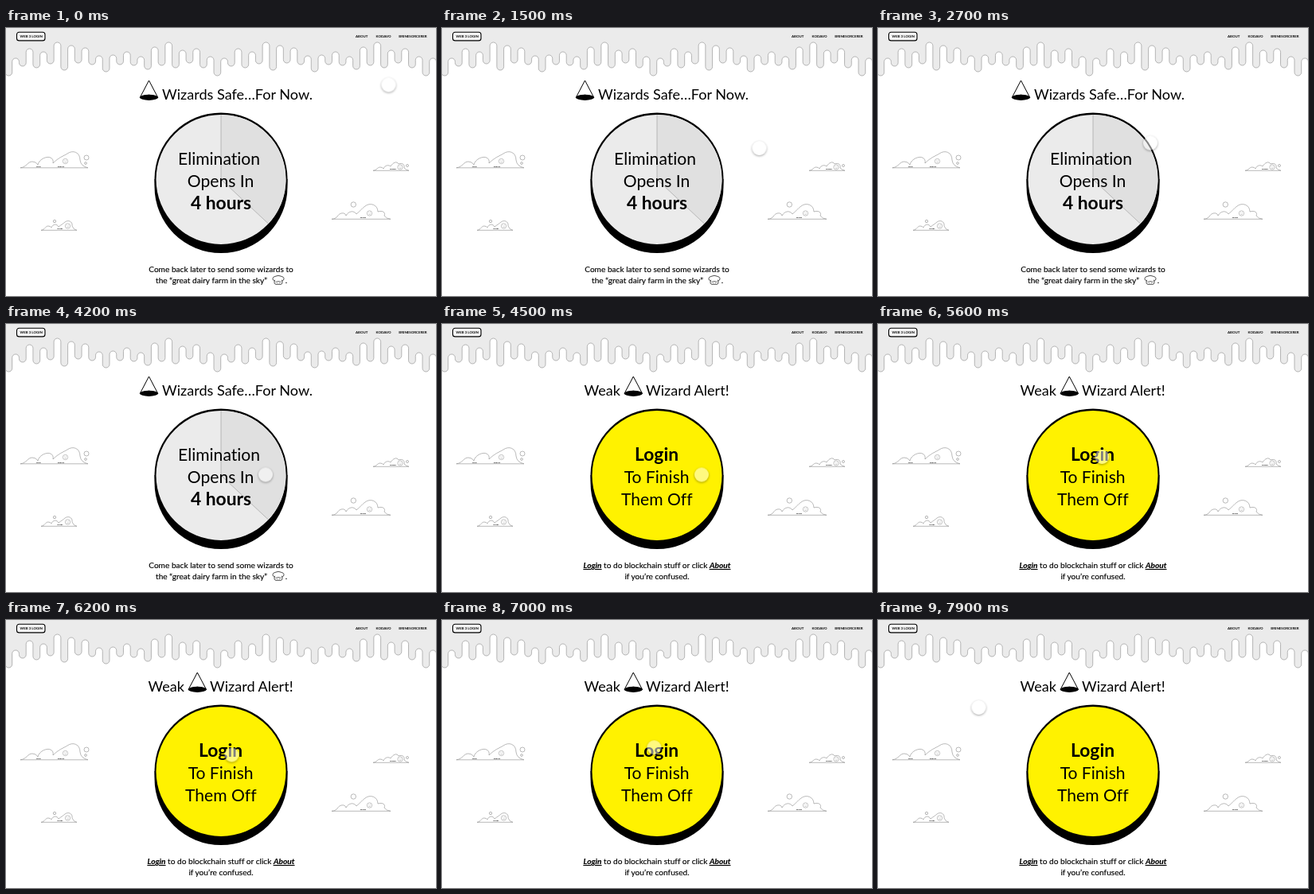
These frames come from a looping animation (540x337 px, 8 s). An HTML page:

```html
<!DOCTYPE html>
<html lang="en">
<head>
<meta charset="utf-8">
<title>Wizard button</title>
<style>
  html, body { margin: 0; width: 100%; height: 100%; overflow: hidden; background: #fff; }
  #stage { position: absolute; left: 0; top: 0; width: 540px; height: 337px; overflow: hidden; }
  svg { display: block; }
  text { font-family: Lato, "Noto Sans", sans-serif; font-variant-ligatures: none; fill: #000; }
  .mid { text-anchor: middle; }
  .end { text-anchor: end; }
  .bold { font-weight: 700; }
  .nav { font-size: 4.4px; font-weight: 700; }
  .title { font-size: 18.1px; }
  .big { font-size: 21.1px; }
  .big.bold { font-size: 22.8px; }
  .note { font-size: 10.15px; stroke: #000; stroke-width: .15; }
  .link { font-weight: 700; font-style: italic; text-decoration: underline; }
  .tiny { font-size: 2.4px; font-weight: 700; text-anchor: middle; }
  .thin { fill: #fff; stroke: #8a8a8a; stroke-width: .6; }
  .bare { fill: none; }

  #wait { animation: wait 8s step-end infinite; }
  #alert { animation: alert 8s step-end infinite; }
  @keyframes wait { 0% { visibility: visible; } 56.25%, 100% { visibility: hidden; } }
  @keyframes alert { 0% { visibility: hidden; } 56.25%, 100% { visibility: visible; } }

  #pointer {
    position: absolute; left: -9px; top: -9px; width: 18px; height: 18px;
    border-radius: 50%; background: rgba(255, 255, 255, .5);
    box-shadow: 0 1px 3px rgba(0, 0, 0, .38);
    animation: move 8s linear infinite;
  }
  @keyframes move {
    0%, 1.25% { transform: translate(480.5px, 71.5px); animation-timing-function: ease-in-out; }
    10%, 17.5% { transform: translate(400.5px, 145px); }
    18.75% { transform: translate(398.5px, 151px); }
    20%, 27.5% { transform: translate(398px, 151.5px); animation-timing-function: ease-in; }
    33.75% { transform: translate(342px, 144.5px); animation-timing-function: ease-out; }
    38.75% { transform: translate(324px, 173px); animation-timing-function: ease-out; }
    41.25%, 48.75% { transform: translate(326px, 188px); }
    50%, 51.25% { transform: translate(326px, 189px); }
    52.5%, 57.5% { transform: translate(326px, 189.5px); animation-timing-function: ease-in-out; }
    66.25% { transform: translate(290px, 173px); animation-timing-function: ease-in-out; }
    72.5% { transform: translate(277px, 164px); animation-timing-function: ease-in-out; }
    77.5% { transform: translate(283.5px, 169.5px); animation-timing-function: ease-in-out; }
    88.75% { transform: translate(266px, 160px); animation-timing-function: ease-in-out; }
    98.75%, 100% { transform: translate(126.5px, 110px); }
  }
</style>
</head>
<body>
<div id="stage">
<svg width="540" height="337" viewBox="0 0 540 337">
  <defs>
    <g id="hat">
      <path d="M0 0L-11.3 21.5Q0 15 11.3 21.5Z" fill="#fff" stroke="#000" stroke-width="1" stroke-linejoin="round"/>
      <ellipse cy="21.3" rx="11.5" ry="3.6"/>
    </g>
    <g id="button">
      <path d="M186.5 190v9.6a83.5 83.5 0 0 0 167 0V190Z"/>
      <circle cx="270" cy="190" r="83.5"/>
      <circle cx="270" cy="190.4" r="81.5" fill="currentColor"/>
    </g>
    <g id="face" class="bare" stroke="#8a8a8a" stroke-width=".5">
      <circle r="3.2"/>
      <path d="M-1.4 -.8h.8M.7 -1h.8M-1 1.1Q.2 2 1.3 .8"/>
    </g>
  </defs>

  <path id="drips" fill="#ebebeb" stroke="#999" stroke-width=".7"/>
  <rect x="13.5" y="5.3" width="35.5" height="10.6" rx="3" fill="#f4f4f4" stroke="#000" stroke-width="1.1"/>
  <text class="nav mid" x="31.7" y="12.3">WEB 3 LOGIN</text>
  <text class="nav" x="439" y="12">ABOUT</text>
  <text class="nav mid" x="474" y="12">KODAVO</text>
  <text class="nav mid" x="511" y="12">BRINESORCERER</text>

  <g class="thin">
    <path d="M18 175.8C26 175 27 168 33 168Q38 168 40 172C42 164 52 161 56 163Q60 165 59 170C66 163 72 161 77 158C84 153 93 156 93 166Q94 174 103 175.8Z"/>
    <circle cx="101" cy="163" r="3"/><circle cx="100" cy="170" r="1.4"/>
    <path d="M44 254.3C49 254 49 249 53 249Q56 249 57 251C59 246 64 246 66 250C70 247 72 246 74 244C78 241 84 243 83 249Q85 254 89 254.3Z"/>
    <circle cx="61" cy="243" r="1.7"/>
    <path d="M461 179.3C466 179 466 175 470 175Q473 175 474 177C476 172 481 172 483 174C486 169 491 167 493 171C498 169 501 172 500 176Q503 179 506 179.3Z"/>
    <circle cx="504" cy="173" r="1.5"/>
    <path d="M409 240.3C417 240 416 234 421 233Q426 232 427 236C430 230 437 229 440 234C446 229 448 226 451 224C457 219 467 222 467 231C473 229 477 232 475 236Q478 240 483 240.3Z"/>
    <circle cx="436.3" cy="222" r="3.2"/>
  </g>
  <use href="#face" x="74.5" y="167.5"/>
  <use href="#face" x="77.5" y="249"/>
  <use href="#face" x="495" y="175"/>
  <use href="#face" x="456.5" y="233"/>
  <text class="tiny" x="41" y="174.6">MILK</text>
  <text class="tiny" x="69" y="174.6">CREAM</text>
  <text class="tiny" x="68" y="253.4">WHEY</text>
  <text class="tiny" x="486" y="178.3">CURDY</text>
  <text class="tiny" x="448.5" y="239.3">RINDS</text>

  <g id="wait">
    <use href="#hat" x="179.5" y="66"/>
    <text class="title" x="196" y="89.6">Wizards Safe…For Now.</text>
    <use href="#button" color="#ebebeb"/>
    <path d="M270 190.4V108.9A81.5 81.5 0 0 1 329.5 246.1Z" fill="#e0e0e0"/>
    <path class="bare" d="M270 108.9V190.4L329.5 246.1" stroke="#999" stroke-width=".6"/>
    <text class="big mid" x="267.6" y="172.4">Elimination</text>
    <text class="big mid" x="269.6" y="200.2">Opens In</text>
    <text class="big bold mid" x="270" y="227.8">4 hours</text>
    <text class="note mid" x="270" y="307">Come back later to send some wizards to</text>
    <text class="note mid" x="258" y="320.7">the “great dairy farm in the sky”</text>
    <path d="M337.5 312.5Q342 310 346.5 312.5Q350 313.5 348.5 317Q347.5 318.5 346.5 317Q348 322 345 322.3H339Q336 322 337.5 317Q336.5 318.5 335.5 317Q334 313.5 337.5 312.5Z" fill="#fff" stroke="#000" stroke-width=".7"/>
    <path class="bare" d="M338.5 319.4Q342 317.6 345.5 319.4M340.4 320.7h.7M343 320.7h.7" stroke="#000" stroke-width=".6"/>
    <text class="note" x="350.8" y="320.7">.</text>
  </g>

  <g id="alert">
    <text class="title end" x="224" y="89.6">Weak</text>
    <use href="#hat" x="240.3" y="66"/>
    <text class="title" x="256" y="89.6">Wizard Alert!</text>
    <use href="#button" color="#fff200"/>
    <text class="big bold mid" x="269.6" y="172.2">Login</text>
    <text class="big mid" x="269.6" y="200.2">To Finish</text>
    <text class="big mid" x="269.8" y="227.8">Them Off</text>
    <text class="note mid" x="270" y="307"><tspan class="link">Login</tspan> to do blockchain stuff or click <tspan class="link">About</tspan></text>
    <text class="note mid" x="270" y="320.7">if you’re confused.</text>
  </g>
</svg>
<div id="pointer"></div>
</div>
<script>
  // Rounded drips: alternating low tips and high gaps, repeated along the bar.
  const lows = [60, 48, 50, 45, 53, 44, 46, 55, 46, 47, 52, 47, 50, 44, 50];
  const highs = [38, 26, 30, 18, 22, 25, 35, 34, 30, 36, 24, 18, 28, 26, 36];
  const half = 262 / (2 * lows.length), r = half / 2;
  let d = 'M-1 -1';
  for (let i = 0, x = -1; x < 545; i++, x += 2 * half) {
    const k = i % lows.length;
    d += `L${x} ${lows[k] - r}a${r} ${r} 0 0 0 ${half} 0` +
         `V${highs[k] + r}a${r} ${r} 0 0 1 ${half} 0`;
  }
  document.getElementById('drips').setAttribute('d', d + 'V-1Z');
</script>
</body>
</html>
```
